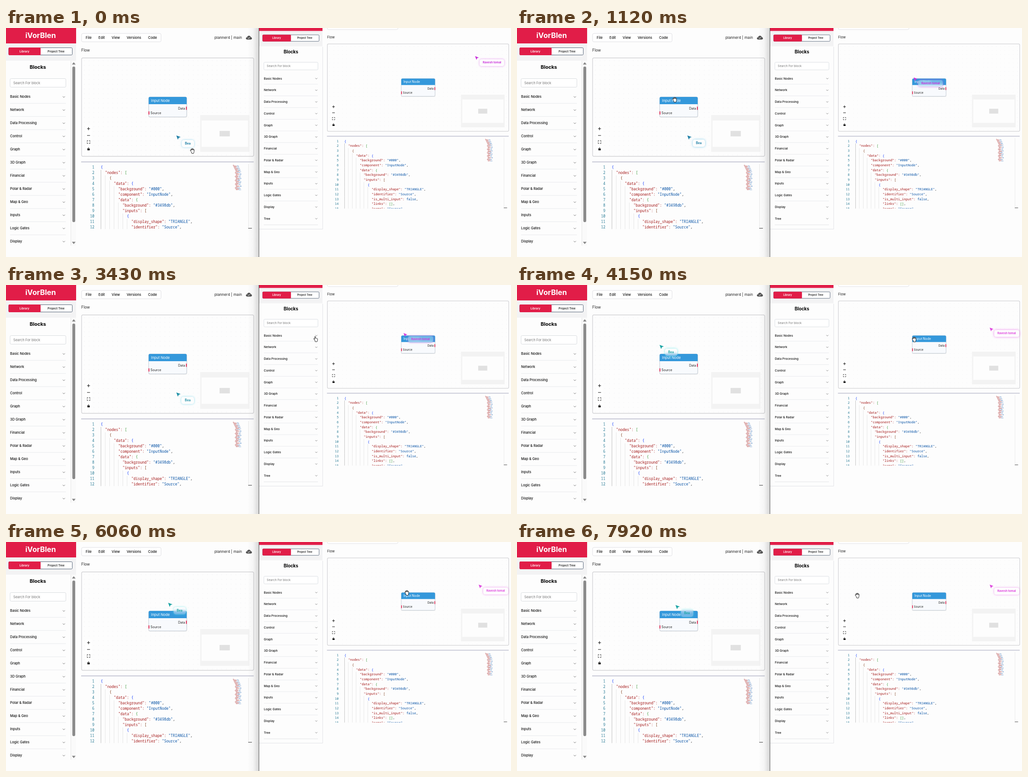
These frames come from a looping animation (1109x505 px, 7990 ms). An HTML page:

```html
<!DOCTYPE html>
<html lang="en">
<head>
<meta charset="utf-8">
<title>Shared flow editor</title>
<style>
html, body { margin: 0; width: 100%; height: 100%; overflow: hidden; background: #fdfdfd; }
#stage { position: absolute; left: 0; top: 0; width: 1109px; height: 505px; overflow: hidden; }
svg { display: block; }
text { font-family: Inter, sans-serif; white-space: pre; }
.code { font: 8px "Noto Sans Mono", monospace; }
.peer, #mouse { position: absolute; left: 0; top: 0; }
.peer svg, #mouse svg { position: absolute; overflow: visible; }
.tag {
  position: absolute; box-sizing: border-box; text-align: center;
  font-family: Inter, sans-serif; font-weight: 700; white-space: nowrap;
  background: rgba(255, 255, 255, .3); backdrop-filter: blur(3px);
}
</style>
</head>
<body>
<div id="stage">
  <svg id="scene" width="1109" height="505" viewBox="0 0 1109 505"></svg>
  <div id="guest" class="peer"></div>
  <div id="host" class="peer"></div>
  <div id="mouse"></div>
</div>
<script>
const LOOP = 7990;
const RED = '#e11d48';
const $ = id => document.getElementById(id);

const rect = (x, y, w, h, fill, more = '') =>
  `<rect x="${x}" y="${y}" width="${w}" height="${h}" fill="${fill}" ${more}/>`;
const path = (d, stroke, width = 1, more = 'fill="none"') =>
  `<path d="${d}" stroke="${stroke}" stroke-width="${width}" ${more}/>`;
// y is the middle of the capital letters
const label = (x, y, size, text, more = '') =>
  `<text x="${x}" y="${y + size * .364}" font-size="${size}" ${more}>${text}</text>`;

const blocks = ['Basic Nodes', 'Network', 'Data Processing', 'Control', 'Graph', '3D Graph',
  'Financial', 'Polar &amp; Radar', 'Map &amp; Geo', 'Inputs', 'Logic Gates', 'Display', 'Tree'];
const menu = [['File', 175], ['Edit', 203], ['View', 232], ['Versions', 265], ['Code', 312]];
const source = [
  [0, '{'], [1, '"nodes": ['], [2, '{'], [3, '"data": {'],
  [4, '"background": "#000",'], [4, '"component": "InputNode",'], [4, '"data": {'],
  [5, '"background": "#3498db",'], [5, '"inputs": ['], [6, '{'],
  [7, '"display_shape": "TRIANGLE",'], [7, '"identifier": "Source",'],
  [7, '"is_multi_input": false,'], [7, '"links": [],'], [7, '"name": "Source",']];

function tokenColor(token, depth) {
  if (/^[{}[\]]/.test(token)) return ['#0431fa', '#319331', '#7b3814'][depth % 3];
  if (/^".*:$/.test(token)) return '#a31515';
  return /^["f]/.test(token) ? '#0451a5' : '#222';
}

function codeLine([depth, text], i) {
  const y = 307 + 12 * i;
  let out = label(194, y, 8, i + 1, 'class="code" fill="#237893" text-anchor="end"');
  for (let k = 0; k < depth; k++)
    out += rect(208 + 9.6 * k, y - 6, .7, 12, k ? '#dcdcdc' : '#a5a5a5');
  const spans = text.match(/"[^"]*":?|[{}[\]]|false|[^"{}[\]]/g)
    .map(s => `<tspan fill="${tokenColor(s, depth)}">${s}</tspan>`).join('');
  return out + label(208 + 9.6 * depth, y, 8, spans, 'class="code"');
}

function codeOverview(x) {
  let out = '';
  for (let i = 0; i < 38; i++) {
    const indent = i < 10 ? i * .7 : 4 + 3 * Math.abs(Math.sin(i * .55));
    const width = 3 + 5 * Math.abs(Math.sin(i * 2.3));
    const y = 302 + i * 1.47;
    out += rect(x + indent, y, width, .9, '#a31515', 'opacity=".5"');
    if (i % 3) out += rect(x + indent + width + 1, y, 9 - width * .7, .9, '#0451a5', 'opacity=".5"');
  }
  return out;
}

function sidebar(p) {
  let out = rect(-3, 0, 157, 34, RED)
    + label(76, 16.5, 16.2, 'iVorBlen', 'fill="#fff" font-weight="700" text-anchor="middle"')
    + rect(-3, 34, 157, 38, '#f3f3f4')
    + rect(6, 43.5, 139.5, 16, '#fff', 'rx="2" stroke="#44556b" stroke-width=".9"')
    + rect(5.6, 43, 70.4, 17, RED, 'rx="2"')
    + label(40.5, 51.5, 6.3, 'Library', 'fill="#fff" font-weight="600" text-anchor="middle"')
    + label(110, 51.5, 6.4, 'Project Tree', 'fill="#222" font-weight="600" text-anchor="middle"')
    + label(p.title, 86, 11, 'Blocks', 'font-weight="700" text-anchor="middle"')
    + rect(9, 111.5, p.listEnd - 9, 19, '#fff', 'rx="2.5" stroke="#d5d8dd" stroke-width=".9"')
    + label(16, 121, 7.4, 'Search For block', 'fill="#757575"');
  blocks.slice(0, p.count).forEach((name, i) => {
    const y = 151.7 + 29 * i;
    out += label(9, y, 7.5, name, 'font-weight="500" fill="#111"')
      + path(`M${p.chevron - 2.5} ${y - 1}l2.5 2.5 2.5-2.5`, '#555', .8);
    if (y < 470) out += rect(9, y + 14, p.listEnd - 9, .8, '#e2e4e8');
  });
  return out;
}

function canvasCard(p) {
  const n = p.node, m = p.map;
  return rect(166, 66, p.end - 166, 217, '#fdfdfd', 'rx="3" stroke="#d3d3d6" stroke-width="1.4"')
    + rect(167, 67, p.end - 168, 215, 'url(#dots)')
    + rect(175, 215, 13, 59, '#fff')
    + path('M178 222h6.5M181.2 218.8v6.5M178 237h6.5', '#111', 1.1)
    + path('M178.2 250.500v-2h2M182.400 248.500h2v2M184.400 252.500v2h-2M180.200 254.500h-2v-2', '#111', .9)
    + rect(178.700, 265.800, 5.200, 4, '#111', 'rx=".6"')
    + path('M179.800 266v-1q1.400-2.600 2.900-.4', '#111', .9)
    + rect(m, 192, 108, 81, '#f3f3f3')
    + rect(m + 3, 204, 102, 58, '#fdfdfd')
    + rect(m + 42.500, 227, 22.500, 12, '#e1e1e1')
    + rect(n - .5, 152, 85, 45.500, '#000', 'rx="3" opacity=".08"')
    + rect(n, 152, 83.500, 44, '#f8fafd', 'rx="3" stroke="#bfc9d4" stroke-width=".9"')
    + `<path d="M${n} 168v-13q0-3 3-3h77.500q3 0 3 3v13z" fill="#3498db"/>`
    + label(n + 5.500, 160.300, 7.800, 'Input Node', 'fill="#fff"')
    + label(n + 80, 177, 7, 'Data', 'fill="#222" text-anchor="end"')
    + label(n + 4, 187, 7, 'Source', 'fill="#222"')
    + rect(n + 82, 173.500, 1.800, 7, RED) + rect(n - .3, 183.800, 1.800, 7, RED);
}

function pane(p) {
  const menuText = menu.map(([s, x]) => label(x, 21.3, 7.7, s, 'font-weight="500" fill="#111"')).join('');
  return `<g transform="translate(${p.x} ${p.y}) scale(${p.scale})">`
    + sidebar(p)
    + rect(166, 12, 174.5, 18.5, '#fff', 'rx="3" stroke="#dcdce0" stroke-width=".9"') + menuText
    + label(518, 21.3, 8.2, 'planner4 | main', 'fill="#222" text-anchor="end"')
    + '<path d="M530 25.500q-3.500-.4-3.200-3 .3-2 2.700-2.300 1.200-3.400 4.300-3.200 3 .2 3.700 3.200 2.700.3 2.700 2.700-.2 2.400-2.700 2.600z" fill="#555"/>'
    + path('M531 21.500l1.800 1.800 3-3.200', '#fff', 1)
    + label(165.5, 49.3, 8.3, 'Flow', 'fill="#222"')
    + canvasCard(p)
    + rect(165, 294, p.end - 165, 2.5, '#d0d1dc')
    + `<clipPath id="${p.id}"><rect x="160" y="298" width="460" height="${p.codeEnd - 298}"/></clipPath>`
    + `<g clip-path="url(#${p.id})">${source.map(codeLine).join('')}${codeOverview(p.overview)}`
    + rect(p.end - 12, 300, .8, 200, '#e3e3e3') + rect(p.end - 12, p.codeEnd - 2.5, 8, 1.2, '#555')
    + '</g></g>';
}

const left = { id: 'codeA', x: 0, y: 0, scale: 1, title: 70, listEnd: 131.5, chevron: 127, count: 12,
  end: 544, node: 313.3, map: 426.5, overview: 498, codeEnd: 443.5 };
const right = { id: 'codeB', x: 558.3, y: -23.5, scale: .888, title: 76, listEnd: 142.7, chevron: 138.7, count: 13,
  end: 614.5, node: 348.8, map: 496.5, overview: 556, codeEnd: 475 };

$('scene').innerHTML = `<defs>
    <pattern id="dots" x="167" y="67" width="10.4" height="10.4" patternUnits="userSpaceOnUse">
      <circle cx="5" cy="5" r=".5" fill="#dedee2"/></pattern>
    <linearGradient id="seam"><stop offset="0" stop-opacity="0"/>
      <stop offset=".5" stop-opacity=".03"/><stop offset="1" stop-opacity=".15"/></linearGradient>
  </defs>`
  + rect(0, 0, 1109, 505, '#fdfdfd')
  + pane(left)
  + rect(142.5, 72, 11.5, 408, '#fafafa') + rect(142.2, 72, .8, 408, '#e2e2e2')
  + rect(145.7, 85, 6.3, 343, '#8b8b8b', 'rx="3.1"')
  + '<path d="M144.800 80.500l4-5 4 5zM144.800 471.500l4 5 4-5z" fill="#858585"/>'
  + rect(530, 0, 25, 505, 'url(#seam)')
  + rect(555, 0, 554, 505, '#fdfdfd')
  + pane(right)
  + path('M695.500 41.500V443.500H556M566 434H685', '#dfe1e5', .9)
  + rect(555, 0, 1, 505, '#555');

function makePeer(id, name, scale, box, fontSize) {
  const [x, y, w, h] = box;
  $(id).innerHTML = `<svg width="10" height="10"><path transform="scale(${scale})"
      d="M0 0L9.500 3.600 5.300 5.100 3.500 9.300z" fill="currentColor"/></svg>
    <div class="tag" style="left:${x}px;top:${y}px;width:${w}px;height:${h}px;line-height:${h}px;
      border-radius:${h * .3}px;font-size:${fontSize}px">${name}</div>`;
}
makePeer('guest', 'Bea', 1, [11.5, 10, 27.5, 16], 6.9);
makePeer('host', 'Ravesh tomal', .888, [10, 7, 54.5, 14.5], 6.2);

const outline = 'fill="#fff" stroke="#111" stroke-width=".9" stroke-linejoin="round"';
const openHand = `<path ${outline} d="M2.600 7.600L.9 5.700Q.1 4.500 1.300 4.200L2.700 5.200 2 2.300q.6-1.300 1.500-.1L3.900 4
  V1.200q.8-1.200 1.600 0V4L6 1.500q.9-1 1.500.2L7.300 4.400 8 3.100q1-.8 1.400.3L9 7.500Q8.800 9.500 8 11.500H4z"/>`;
const pointer = `<path ${outline} d="M3 8L.9 6.300Q.3 4.900 1.700 5L3 6.200V1q.9-1.300 1.800 0V4.600q.9-.7 1.600.1
  .9-.5 1.500.4 1-.3 1.200.7V8.300Q9 10 8 12H4z"/>`;
$('mouse').innerHTML = `<svg width="10" height="12"><g id="hand">${openHand}</g><g id="finger">${pointer}</g></svg>`;

// [time, x, y]
const mousePath = [[0, 409, 271], [790, 364, 180], [1120, 346, 158], [1710, 345, 158], [2330, 356, 157],
  [3290, 356, 157], [3430, 680, 119], [3700, 740, 88], [4150, 872, 120], [4900, 876, 130],
  [5600, 880, 112], [7400, 880, 112], [7920, 747, 118]];
const hostPath = [[0, 1030, 62], [790, 940, 105], [1120, 871, 109], [1650, 868, 100], [2330, 863, 94],
  [2900, 870, 102], [3430, 873, 106], [3900, 1038, 94]];
const guestPath = [[0, 374, 237], [3430, 374, 237], [3750, 246, 100], [4150, 313, 132], [4900, 350, 150],
  [5400, 350, 150], [5800, 356, 134], [6700, 356, 134], [7300, 357, 140], [7700, 347, 148], [7920, 348, 139]];

function along(keys, t) {
  const i = keys.findIndex(k => k[0] > t);
  if (i < 0) return keys[keys.length - 1].slice(1);
  const [t0, x0, y0] = keys[i - 1], [t1, x1, y1] = keys[i];
  const u = (t - t0) / (t1 - t0), e = u * u * (3 - 2 * u);
  return [x0 + (x1 - x0) * e, y0 + (y1 - y0) * e];
}

function place(el, [x, y]) {
  el.style.left = x + 'px';
  el.style.top = y + 'px';
}

function showPeer(id, keys, t, hue, light) {
  const el = $(id), tag = el.querySelector('.tag');
  const wave = (1 + Math.cos(2 * Math.PI * (t - 2330) / 1600)) / 2;
  place(el, along(keys, t));
  el.style.color = `hsl(${hue} 70% ${light}%)`;
  tag.style.transform = `translateY(${-2 * wave}px)`;
  tag.style.boxShadow = `0 0 ${4 + wave * 2}px hsl(${hue} 75% 62% / ${.6 + wave * .2})`;
}

function draw(now) {
  const t = now % LOOP;
  const shift = Math.min(1, Math.max(0, (t - 3000) / 1000));
  showPeer('guest', guestPath, t, 197 - 17 * shift, 38);
  showPeer('host', hostPath, t, 294 + 6 * shift, 53 + 3 * shift);
  const [x, y] = along(mousePath, t);
  const overList = x > 556 && x < 706;
  place($('mouse'), [x - 5, y - 6]);
  $('hand').style.display = overList ? 'none' : '';
  $('finger').style.display = overList ? '' : 'none';
}

const start = performance.now();
function tick() {
  draw(performance.now() - start);
  requestAnimationFrame(tick);
}
tick();
</script>
</body>
</html>
```
